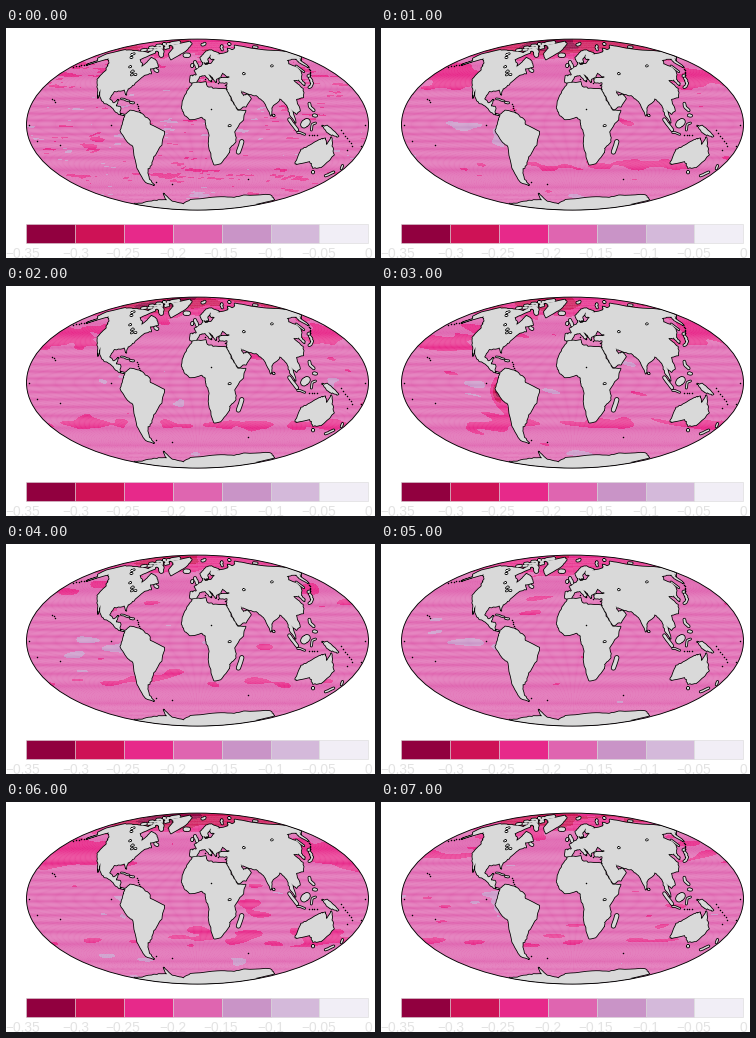
A matplotlib script for the animation above (8 s loop, 369 px wide and 230 px high).

```python
import numpy as np
import matplotlib.pyplot as plt
from matplotlib.animation import FuncAnimation
from matplotlib.patches import Ellipse, Polygon, Rectangle

W, H, DPI = 369, 230, 64
PX = 72 / DPI
CX, CY, RX, RY = 191.5, 96.6, 171, 85.5
COLORS = ["#91003f", "#ce1256", "#e7298a", "#df65b0",
          "#c994c7", "#d4b9da", "#f1eef6"]
RGB = np.array([[int(c[i:i + 2], 16) / 255 for i in (1, 3, 5)] for c in COLORS])
LAND, TEXT = "#d9d9d9", "#e3e3e3"

fig = plt.figure(figsize=(W / DPI, H / DPI), dpi=DPI, facecolor="white")
ax = fig.add_axes([0, 0, 1, 1])
ax.set_xlim(0, W)
ax.set_ylim(H, 0)
ax.axis("off")
globe = Ellipse((CX, CY), 2 * RX, 2 * RY, fc="none", ec="black",
                lw=0.9 * PX, zorder=8)
ax.add_patch(globe)


# ---- Mollweide projection, both ways, in pixels
def project(lon, lat):
    grid = np.linspace(-np.pi / 2, np.pi / 2, 4001)
    t = np.interp(np.pi * np.sin(np.radians(lat)), 2 * grid + np.sin(2 * grid), grid)
    return CX + RX * lon / 180 * np.cos(t), CY - RY * np.sin(t)


def unproject(x, y):
    t = np.arcsin(np.clip((CY - y) / RY, -0.9999, 0.9999))
    lat = np.degrees(np.arcsin((2 * t + np.sin(2 * t)) / np.pi))
    return 180 * (x - CX) / (RX * np.cos(t)), lat


# ---- land
rough = np.random.default_rng(4)


def path(pts, steps, jitter):
    p = np.array(pts, float).reshape(-1, 2)
    k = np.linspace(0, len(p) - 1, (len(p) - 1) * steps + 1)
    lon, lat = (np.interp(k, np.arange(len(p)), c) + rough.normal(0, jitter, k.size)
                for c in p.T)
    return project(np.clip(lon, -180, 180), np.clip(lat, -90, 90))


def land(*pts):
    """Continent: an outline below, a fill above, so overlaps merge."""
    xy = np.column_stack(path(pts + pts[:2], 5, 0.3))
    for z, fc, ec in ((3, "none", "black"), (4, LAND, "none")):
        p = ax.add_patch(Polygon(xy, fc=fc, ec=ec, lw=1.6 * PX, zorder=z,
                                 joinstyle="round"))
        p.set_clip_path(globe)


def strip(width, *pts, fill=LAND, z=3):
    """Island or lake: a thick line with a black rim."""
    x, y = path(pts, 3, 0.25)
    for dz, w, c in ((0, width + 1.6, "black"), (1, width, fill)):
        ax.plot(x, y, color=c, lw=w * PX, zorder=z + dz, solid_capstyle="round",
                solid_joinstyle="round", clip_path=globe)


def dots(n, lon0, lat0, lon1, lat1):
    x, y = project(np.linspace(lon0, lon1, n), np.linspace(lat0, lat1, n))
    ax.scatter(x, y, s=(1.5 * PX) ** 2, c="black", linewidths=0, zorder=5)


# Africa
land(-6, 36, 10, 37, 11, 33.5, 20, 31, 33, 31, 37, 21, 43, 12, 51, 12, 48, 5,
     39, -6, 41, -15, 35, -20, 35, -24, 27, -34, 19, -35, 12, -18, 13, -9,
     9, -1, 9, 4, 4, 6, -8, 4.5, -13, 8, -17, 14, -16, 21, -10, 31)
# Europe
land(34, 31, 36, 36.5, 27, 37, 27, 40.5, 41, 41.5, 33, 46, 28.5, 42, 23, 40,
     22, 37, 19, 42, 13, 45.5, 18, 40, 16, 38, 10, 44, 3, 43, -2, 37, -9, 37,
     -9, 43, -1, 44, -4, 48.5, 8, 54, 9, 57.5, 11, 54, 21, 55.5, 28, 60,
     22, 61, 24, 65.5, 17, 61, 16, 56.5, 12, 56, 6, 58.5, 5, 62, 15, 68.5,
     27, 71, 41, 67, 34, 65, 44, 66.5, 68, 69, 68, 45, 50, 36, 42, 30)
# Asia
land(60, 68.5, 70, 73, 75, 71, 104, 77.5, 128, 72, 160, 70, 180, 69,
     178, 62.5, 163, 59, 157, 51, 156, 57, 163, 61, 143, 59, 135, 54.5,
     141, 52, 139, 47, 128, 40, 129, 35.5, 126, 34.5, 125, 39.5, 118, 39,
     122, 31, 117, 23.5, 108, 21.5, 109, 12, 105, 9, 100.5, 13.5, 103.5, 1.5,
     98, 9, 97, 16.5, 91, 22.5, 80, 15, 77.5, 8, 72.5, 20, 66, 25, 57, 26.5,
     49, 30, 51, 24.5, 56, 26, 59.5, 22.5, 52, 16, 43.5, 13, 39, 21, 34.5, 29,
     36, 35, 50, 45)
# North and Central America
land(-168, 66, -156, 71, -128, 70, -95, 68, -94, 72, -82, 68, -94, 60,
     -82, 55, -80, 51.5, -77, 57, -78, 62, -66, 59, -56, 52, -66, 50, -61, 46,
     -70, 43, -76, 35, -81, 31, -80, 25.5, -84, 30, -95, 29, -97.5, 22,
     -91, 18.5, -87, 21.5, -88, 16, -83.5, 15, -82, 9, -77, 8, -85, 10,
     -94, 16, -105, 20, -113, 31, -110, 23, -117, 33, -124, 40, -124, 48,
     -133, 56, -147, 61, -163, 54.5, -157, 58.5, -165, 61)
# South America
land(-77, 8, -72, 12, -62, 10.5, -51, 4, -50, 0, -35, -6, -39, -17, -48, -26,
     -57, -37, -62, -39, -66, -48, -65, -55, -74, -52, -73, -38, -70, -19,
     -76, -14, -81, -5, -78, 3)
# Greenland, Australia, New Guinea
land(-73, 78, -33, 83.5, -18, 80, -24, 70.5, -43, 60, -53, 66, -56, 74)
land(114, -22, 122, -18, 130, -13, 136, -12, 140, -17.5, 142.5, -11, 146, -18,
     153, -26, 150, -37.5, 141, -38, 131, -31.5, 118, -35, 115, -33)
land(131, -1, 138, -1.5, 150, -10, 143, -9, 138, -7)
# Antarctica
land(-180, -78, -150, -77, -100, -73, -68, -72, -60, -64, -61, -74, -40, -78,
     -15, -72, 40, -69, 75, -69, 90, -66.5, 135, -66, 168, -72, 165, -78,
     180, -78, 180, -90, -180, -90)

# Canadian Arctic
for row, lat in enumerate((71, 74, 77, 79.5)):
    for lon in range(-118 + 4 * row, -75, 12):
        strip(2, lon, lat, lon + 6, lat + rough.uniform(-1, 1))
strip(4, -85, 72, -72, 69, -66, 65)
strip(3, -85, 80, -70, 82)
strip(2.5, -58, 49, -54, 48)
# Europe and Russia
strip(3.5, -22, 64.8, -16, 65)
strip(2.5, -1, 52, -4, 57)
strip(2, -8, 53, -7.5, 54.5)
strip(2, 14, 78.5, 24, 80)
strip(1.5, 54, 71.5, 58, 75, 66, 76.5)
strip(1.5, 96, 79, 103, 80)
strip(1.5, 140, 75, 148, 75)
# Caribbean, Indian Ocean and the East Indies
strip(0.8, -84, 22.3, -75, 20.3)
strip(1.2, -73, 19, -69.5, 18.7)
strip(3.5, 45.5, -23.5, 48, -15)
strip(1, 80.5, 8.5, 81, 7)
strip(2.5, 96.5, 4.5, 104.5, -4.5)
strip(1, 106, -7, 114, -8)
strip(6, 112, 0, 115, 2.5)
strip(1.2, 120, -5, 120.5, 0, 124, 1)
strip(2, 121, 18, 121, 15, 124, 12)
strip(2, 123.5, 8, 125.5, 7.5)
# Japan, Sakhalin, Tasmania, New Zealand
strip(1.8, 131, 32.5, 138, 36, 141, 40.5)
strip(2, 142, 43, 144, 43.5)
strip(1, 142.5, 47, 142.7, 53)
strip(2, 146, -42, 147, -42.5)
strip(1.5, 174, -36, 176.5, -39)
strip(1.5, 172, -42, 168.5, -45.5)
# Lakes
for lon, lat in ((-88, 47.5), (-86, 44), (-81, 44), (-97, 52), (-113, 62),
                 (-121, 66), (33, -1), (107, 53), (60, 45)):
    strip(0.9, lon, lat, lon + 1.5, lat + 0.5, fill="white", z=5)
# Island arcs
dots(3, -160, 22, -155.5, 19.5)
dots(5, -66, 18, -61, 11)
dots(7, 151, -5, 168, -18)
dots(5, 146, 44, 155, 50)
dots(5, -166, 54, -178, 52)
dots(4, 118, -9, 127, -8.5)
dots(4, 9, 40, 33, 35)
for spot in ((69, -49), (-37, -54), (-59, -52), (-91, -0.5), (165, -21.5),
             (178, -18), (14, 13), (-149, -17.5), (-172, -14), (-177, 0), (176, 0)):
    dots(1, *spot, *spot)

# ---- ocean: a class map per step from a few climate features
X, Y = np.meshgrid(np.arange(W) + 0.5, np.arange(H) + 0.5)
LON, LAT = unproject(X, Y)


def split(a, b):
    """Where the first whole degree falls inside a pixel."""
    return np.clip((np.ceil(a) - a) / np.maximum(b - a, 1e-6), 0, 1)


u = split(unproject(X - 0.5, Y)[0], unproject(X + 0.5, Y)[0])
v = split(unproject(X, Y + 0.5)[1], unproject(X, Y - 0.5)[1])
seam = (0.65 * (v * (1 - v) + 0.35 * u * (1 - u)))[..., None]


def bump(a, mid, width):
    return np.exp(-((a - mid) / width) ** 2)


def zonal_noise(seed, fine):
    rng = np.random.default_rng(seed)
    total = np.zeros((H, W))
    for _ in range(18):
        kx, ky = rng.normal(0, 0.09), rng.normal(0, 0.32)
        total += np.sin(fine * (kx * X + ky * Y) + rng.uniform(0, 6.3)) / 3
    return total


def field(seed, arctic, pacific, south, indian, tongue, coast,
          south_lat=-36, fine=1.0, noise=0.2):
    west = 0.75 + 0.25 * np.cos(np.radians(LON + 80))
    dateline = 0.5 + 0.5 * np.cos(np.radians(LON - 180))
    shore = -80 + 0.6 * np.clip(-LAT - 15, 0, 15)
    q = 3.5 + noise * zonal_noise(seed, fine)
    q -= arctic * west / (1 + np.exp((66 - LAT) / 4))
    q -= pacific * dateline * bump(LAT, 41, 14)
    q -= south * bump(LAT, south_lat, 6)
    q -= indian * bump(LAT, -3, 14) * bump(LON, 60, 18)
    q += tongue * bump(LAT, -1, 5) * bump(LON, -105, 22)
    q += coast * bump(LAT, -9, 11) * bump(LON, shore, 6)
    q += 0.5 * bump(LAT, -67, 4) * bump(LON, 0, 30)
    rgb = RGB[np.clip(np.floor(q), 0, 6).astype(int)]
    return rgb + (1 - rgb) * seam


fields = [
    field(1, 1.8, 0.45, 0.35, 0.0, 0.3, 0.0, south_lat=-46, fine=2.4, noise=0.27),
    field(2, 3.3, 0.75, 0.50, 0.5, 0.4, 0.9),
    field(3, 2.8, 0.75, 0.55, 0.2, 0.5, 0.3),
    field(4, 2.4, 0.80, 0.60, 0.0, 0.6, -2.8),
    field(5, 2.0, 0.50, 0.35, 0.0, 0.8, 0.4),
    field(6, 1.6, 0.25, 0.10, 0.0, 1.0, 0.6),
    field(7, 3.3, 0.90, 0.55, 0.7, 0.2, 0.6),
    field(8, 2.3, 0.55, 0.40, 0.0, 0.4, 0.7),
]
ocean = ax.imshow(fields[0], extent=(0, W, H, 0), interpolation="nearest",
                  aspect="auto", zorder=1)
ocean.set_clip_path(globe)

# ---- colour bar
LEFT, STEP, TOP, TALL = 20, 48.9, 196, 19
for i, c in enumerate(COLORS):
    ax.add_patch(Rectangle((LEFT + i * STEP, TOP), STEP, TALL, fc=c,
                           ec="#d6d6d6", lw=0.5 * PX))
for i in range(8):
    s = f"{-0.35 + 0.05 * i:.2f}".rstrip("0").rstrip(".").replace("-", "−")
    s = "0" if i == 7 else s
    x = LEFT + 0.5 + i * STEP - (1.5 if len(s) == 5 else 0) - (2.5 if i == 0 else 0)
    ax.text(x, 230.2, s, ha="center", va="baseline", color=TEXT,
            family="Liberation Sans", fontsize=13.7 * PX)


def draw(i):
    ocean.set_data(fields[i % len(fields)])
    return [ocean]


anim = FuncAnimation(fig, draw, frames=len(fields), interval=1000,
                     repeat=True, repeat_delay=0, blit=False)
plt.show()
```
